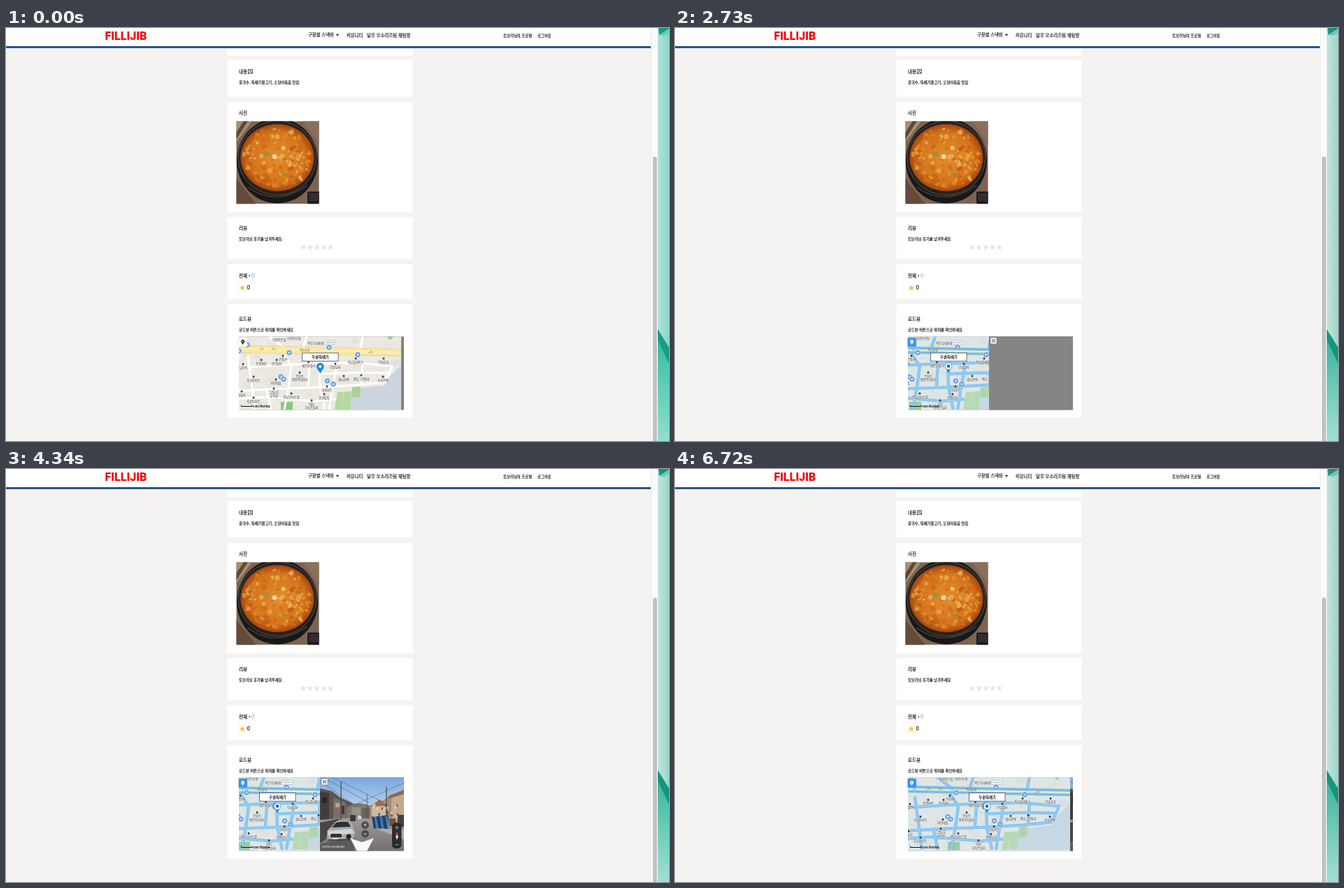
An HTML page for the animation above (8750 ms loop, 948 by 591 pixels).

```html
<!DOCTYPE html>
<html lang="ko">
<head>
<meta charset="utf-8">
<title>맛집 상세</title>
<style>
html, body { margin: 0; width: 100%; height: 100%; overflow: hidden; background: #f4f3f2; }
svg { display: block; width: 948px; height: 591px; }
text { font-family: "Noto Sans CJK KR", "Noto Sans CJK", "Noto Sans", sans-serif; }
.ink { fill: #111; stroke: #111; stroke-width: .16px; }
.logo { font-family: Roboto, "Liberation Sans", sans-serif; font-weight: 900; }
</style>
</head>
<body>
<svg id="stage" viewBox="0 0 948 591" xmlns="http://www.w3.org/2000/svg"></svg>
<script>
const LOOP = 8750, STEP = 70;

function rng(seed) {
  return () => (seed = (seed * 16807) % 2147483647) / 2147483647;
}
const rect = (x, y, w, h, fill, more = '') =>
  `<rect x="${x}" y="${y}" width="${w}" height="${h}" fill="${fill}" ${more}/>`;
const dot = (x, y, r, fill, more = '') =>
  `<circle cx="${x}" cy="${y}" r="${r}" fill="${fill}" ${more}/>`;
const oval = (x, y, rx, ry, fill, more = '') =>
  `<ellipse cx="${x}" cy="${y}" rx="${rx}" ry="${ry}" fill="${fill}" ${more}/>`;
const shape = (d, fill, more = '') => `<path d="${d}" fill="${fill}" ${more}/>`;
const line = (d, color, w, more = '') => shape(d, 'none', `stroke="${color}" stroke-width="${w}" ${more}`);
// text placed by the vertical centre of its glyphs
const label = (x, cy, size, str, more = 'class="ink"') =>
  `<text x="${x}" y="${(cy + size * 0.37).toFixed(2)}" font-size="${size}" ${more}>${str}</text>`;
const middle = 'text-anchor="middle"';

function star(cx, cy, r, fill) {
  const pts = [];
  for (let i = 0; i < 10; i++) {
    const a = i * Math.PI / 5, q = i % 2 ? r * 0.45 : r;
    pts.push((cx + q * Math.sin(a)).toFixed(2) + ',' + (cy - q * Math.cos(a)).toFixed(2));
  }
  return `<polygon points="${pts.join(' ')}" fill="${fill}"/>`;
}

function defs() {
  return `<defs>
    <linearGradient id="mint" x1="0" y1="0" x2="1" y2="0"><stop stop-color="#c2e5dc"/><stop offset="1" stop-color="#9ad6c8"/></linearGradient>
    <linearGradient id="teal" x1="0" y1="0" x2="0" y2="1"><stop stop-color="#2fae97"/><stop offset=".45" stop-color="#63c9b4"/><stop offset="1" stop-color="#a2dfd2"/></linearGradient>
    <linearGradient id="sky" x1="0" y1="0" x2="0" y2=".6"><stop stop-color="#78a9df"/><stop offset="1" stop-color="#d3e2f0"/></linearGradient>
    <linearGradient id="road" x1="0" y1="0" x2="0" y2="1"><stop stop-color="#a09b98"/><stop offset="1" stop-color="#747072"/></linearGradient>
    <radialGradient id="stew"><stop stop-color="#e18e2c"/><stop offset=".75" stop-color="#d4751c"/><stop offset="1" stop-color="#a8460e"/></radialGradient>
    <clipPath id="dishClip"><rect x="329.5" y="133.5" width="118" height="118"/></clipPath>
    <clipPath id="mapClip"><rect id="mapWin" x="333" y="441.5" width="232" height="105"/></clipPath>
    <clipPath id="viewClip"><rect x="449" y="441.5" width="120" height="105"/></clipPath>
    <clipPath id="edgeClip"><rect x="565" y="441.5" width="4" height="105"/></clipPath>
    <filter id="soft"><feGaussianBlur stdDeviation="1.1"/></filter>
  </defs>`;
}

function desktop() {
  return rect(932, 0, 16, 591, 'url(#mint)')
    + shape('M933 0H948V1L934 10Z', '#18907e')
    + shape('M934 10L948 1V7L941 11Z', '#73c6b6')
    + shape('M932 432L948 462V591H932Z', 'url(#teal)')
    + shape('M932 431L948 457V480L932 446Z', '#15957f')
    + rect(932, 0, 16, 591, '#27d6b0', 'id="glow"');
}

function frame() {
  return rect(0, 0, 922, 591, '#f4f3f2')
    + rect(922, 0, 10, 591, '#fafafa') + rect(922, 0, 0.8, 591, '#e6e6e6')
    + rect(925, 184, 5.8, 412, '#c1c1c1', 'rx="2.9"')
    + rect(0, 0, 922, 26, '#fff') + rect(0, 26, 922, 2.8, '#1d4b86')
    + '<text class="logo" x="141.5" y="17" font-size="16" fill="#f5080d">FILLIJIB</text>'
    + label(432, 10, 6.3, '구장별 스낵바') + shape('M471.7 8.8H476.3L474 11.2Z', '#111')
    + label(487, 10.8, 6.3, '커뮤니티')
    + label(516, 10.8, 6.4, '달무 오소리즈팀 채팅방')
    + label(711, 11.3, 5.4, '토보리님의 프로필')
    + label(760, 11.3, 5.3, '로그아웃');
}

function cards() {
  const tops = [[29.5, 10.5], [46, 52.5], [106, 157.5], [270.5, 60.5], [338, 50], [395, 162.5]];
  let s = tops.map(([y, h]) => rect(316.5, y, 265, h, '#fff')).join('');
  s += label(333, 62.2, 6.5, '내용')
    + rect(346.3, 59.6, 6.2, 5.4, 'none', 'stroke="#222" stroke-width=".8"')
    + line('M345.6 66L350.5 61M348 61.2H351M350 63.5H352', '#222', 0.7)
    + label(333, 77.6, 5.35, '콩국수, 뚝배기불고기, 오징어볶음 맛집')
    + label(333, 121.8, 6.5, '사진')
    + label(333, 286.6, 6.5, '리뷰')
    + label(333, 301.8, 5.3, '토보리님 후기를 남겨주세요.')
    + label(333, 354.3, 6.5, '전체') + dot(348.2, 354.4, 0.9, '#222')
    + label(351, 354.3, 7.6, '0', 'fill="#55a5dc"')
    + label(344.4, 371, 8, '0')
    + label(333, 416.6, 6.5, '로드뷰')
    + label(333, 431.8, 5.33, '로드뷰 버튼으로 위치를 확인하세요');
  for (let i = 0; i < 5; i++) s += star(425 + i * 9.75, 314, 4.6, '#e6e6e6');
  s += star(338, 372, 4.4, '#fbbf45')
    + line('M333.6 367.5L335 369M342.4 367.5L341 369M333 374.5H334.5M341.8 374.5H343', '#f5b95a', 0.7);
  return s;
}

function dish() {
  const r = rng(41);
  const tones = ['#eeb248', '#dc7a1e', '#bd5413', '#f2c46a', '#d0681a', '#e8952f'];
  let bits = '';
  for (let i = 0; i < 150; i++) {
    const a = r() * 6.283, q = Math.sqrt(r());
    const x = (388 + 48 * q * Math.cos(a)).toFixed(1), y = (185 + 43 * q * Math.sin(a)).toFixed(1);
    bits += oval(x, y, (1 + r() * 4).toFixed(1), (1 + r() * 2.6).toFixed(1), tones[i % 6],
      `opacity=".6" transform="rotate(${(r() * 180) | 0} ${x} ${y})"`);
  }
  return '<g clip-path="url(#dishClip)">' + rect(329, 133, 119, 119, '#7b6453')
    + shape('M329 133H352L329 164Z', '#a78f75') + shape('M329 150L340 133H346L329 160Z', '#5d4938')
    + shape('M448 133V165L424 133Z', '#8a705a') + shape('M329 215L358 252H329Z', '#644b3a')
    + oval(388, 190, 58, 61, '#191717')
    + oval(388, 186, 56, 53, '#262220', 'stroke="#57504b" stroke-width="1"')
    + oval(388, 185.5, 52.5, 48, 'url(#stew)') + bits
    + oval(372, 180, 5, 3.5, '#9a8f45', 'opacity=".8"') + oval(400, 209, 4, 2, '#96873b', 'opacity=".8"')
    + dot(384, 184, 3.6, '#f0d5a5') + dot(396, 171, 2.2, '#f2cc86')
    + line('M345 227Q386 257 431 225', '#3f3a37', 1.6)
    + rect(431, 234, 18, 18, '#1c191a', 'rx="2"') + rect(433, 236, 15, 12, '#302c30') + '</g>';
}

const MAIN = 'M320 459L450 462L640 466';
const STREETS = [
  'M320 487L400 482L448 480L500 479L552 484L548 494L541 507L500 511L450 514L395 516L320 520',
  'M320 531L372 528L440 534L472 531', 'M448 495L510 493L546 494',
  'M346 470L356 546', 'M372 515L379 546', 'M396 466L408 484L404 514L398 546',
  'M434 482L432 512', 'M448 480L449 514L456 546', 'M474 476L467 515L462 546',
  'M510 479L508 510', 'M340 441L346 460', 'M376 441L401 460',
  'M430 441L424 460', 'M510 441L506 462'
].join('');

const PLACES = [
  [391, 446, '여름아트빌'], [412, 444.5, '어린이공원'], [443, 451, '작은무대바람'],
  [396, 474, '구멍24'], [365, 480, '문결맨션'], [387, 480, '공단빌라'],
  [432.5, 483, '새온달빌라'], [471, 485.5, '안솔빌라'], [500, 478, '독담플레이스'],
  [540, 478, '먹돌상회'], [483, 503, '샘터주택'], [508, 502, '경담그린빌라'],
  [539, 504, '서루주택'], [420, 498, '문솔동'], [420, 503.5, '행정복지센터'],
  [354, 504, '포담아파트'], [386, 508, '파란해솔'], [459, 518, '마루마트'],
  [383, 521, '그린나우'], [383, 526, '유치원'], [408, 528, '안담오피스텔'],
  [455, 529, '문결빌딩'], [354, 534, '푸른아파트'], [437, 538, '대담'],
  [437, 543.5, '하루츠빌라'], [339, 486, '담주택'], [337, 525, '솔빌라']
];
const STOPS = [[462, 457], [503, 467.5], [405, 464.5], [393, 499], [397, 502.5], [459.5, 505], [468, 509.5], [345, 453.5], [333, 462]];

function mapLayer() {
  const r = rng(17);
  let s = rect(320, 430, 320, 125, '#ebe9e1');
  for (let i = 0; i < 80; i++) {
    s += rect((330 + r() * 215).toFixed(1), (440 + r() * 100).toFixed(1), (4 + r() * 8).toFixed(1), (3 + r() * 6).toFixed(1), i % 3 ? '#e6e3da' : '#efede7');
  }
  s += shape('M640 474L566 482L550 497L542 511L497 517L486 546H640Z', '#ccd5df')
    + shape('M542 489L566 482V474L552 476Z', '#dfe2e2')
    + shape('M474 521L494 520L492 546H470Z', '#b4d8a0') + line('M483 521L480 546', '#d0e6c3', 0.8)
    + shape('M495 514L507 513L506 528L494 529Z', '#a9d393')
    + rect(393, 535, 17, 12, '#8ec57b') + shape('M544 441H555L549 446.5Z', '#93cd87')
    + line(STREETS, '#fff', 3.2, 'stroke-linejoin="round"')
    + line(MAIN, '#dcca7c', 10.5) + line(MAIN, '#f9e9a4', 9.3)
    + line(MAIN, '#fff7d8', 0.6);
  s += '<g id="overlay">' + rect(320, 430, 320, 125, '#b9dcee', 'opacity=".28"')
    + line(STREETS, '#6dbaf0', 4.2, 'opacity=".9" stroke-linejoin="round"')
    + line(STREETS, '#94cdf4', 2, 'stroke-linejoin="round"')
    + `<g transform="translate(0 -3)">${line(MAIN, '#74bcee', 3.6)}</g>`
    + `<g transform="translate(0 3.4)">${line(MAIN, '#74bcee', 3.4)}</g></g>`;
  s += line('M365 457.5L368 459.5L362 460.5M384 457.5L380 459.5L386 460.5M520 462L524 464L518 465', '#8a8258', 0.6)
    + label(427, 461.2, 4, '먹소로로', 'fill="#665f42" ' + middle);
  for (const [x, y, name] of PLACES) {
    s += label(x, y, 4.2, name, `fill="#222" stroke="#fff" stroke-width=".5" paint-order="stroke" ${middle}`);
    if (y > 470 && y !== 503.5 && y < 540 && y !== 526) s += rect(x - 1.3, y - 6.4, 2.6, 2.8, '#444', 'rx=".6"');
  }
  s += rect(456, 447, 15, 6, '#f7f9fb', 'rx="1.5" stroke="#9aa9bb" stroke-width=".6"') + rect(458, 449.3, 11, 1.5, '#b5c0ce');
  for (const [x, y] of STOPS) s += dot(x, y, 3.8, '#4a8bd8', 'stroke="#fff" stroke-width=".5"') + rect(x - 1.7, y - 1.8, 3.4, 3.2, '#fff', 'rx=".6"') + rect(x - 1.1, y - 1.1, 2.2, 1.1, '#4a8bd8');
  s += '<g id="pin">' + shape('M449.3 495C447.5 490 444 488.5 444 484.3A5.3 5.3 0 0 1 454.6 484.3C454.6 488.5 451.2 490 449.3 495Z', '#2a86df') + dot(449.3, 484.4, 2, '#fff') + '</g>';
  s += '<g id="walker">'
    + shape('M449 494L446 488H452Z', '#3a7fc4')
    + shape('M444 489A7 7 0 0 1 447 478L449 484Z', '#2f7fd6', 'id="wedge"')
    + dot(449, 484, 5, '#fff', 'stroke="#5d9bdc" stroke-width="1"') + dot(449, 484, 2.4, '#1d72d2') + '</g>';
  s += rect(423.5, 465, 51.5, 11.8, '#fff', 'stroke="#4d5f74" stroke-width=".9"')
    + label(449.5, 471.2, 5.3, '두솥뚝배기', 'class="ink" ' + middle);
  return `<g clip-path="url(#mapClip)"><g id="map">${s}</g>`
    + line('M336.5 539.5V541.5H352V539.5', '#111', 1)
    + label(353.3, 541.3, 4, '50m', 'fill="#111" font-weight="700"')
    + label(363, 541.3, 4.4, 'Noriba', 'fill="#111" font-weight="700"') + '</g>';
}

function street() {
  const r = rng(9);
  let s = rect(449, 441, 120, 106, 'url(#sky)')
    + shape('M449 457L466 461L478 470L497 479V503H449Z', '#5d5450')
    + shape('M449 461L462 464V506H449Z', '#423c3a')
    + shape('M468 470L486 478V501H468Z', '#7d6e65')
    + rect(452, 470, 7, 8, '#272628') + rect(471, 478, 6, 6, '#b3a79c') + rect(480, 482, 4, 12, '#3e3937')
    + shape('M487 484Q500 474 522 482V502H487Z', '#77786f')
    + rect(494, 484, 13, 14, '#988f84') + rect(509, 485, 12, 14, '#6b6259')
    + shape('M569 460L550 466L540 474L520 482V505H569Z', '#a08d7d')
    + shape('M569 463L551 469V503H569Z', '#c3a98d')
    + shape('M547 468L569 459V465L547 472Z', '#99644a')
    + shape('M523 483L534 475L545 482V501H523Z', '#d0b89d') + shape('M521 483L534 473L546 482Z', '#a4694a');
  for (let i = 0; i < 18; i++) s += rect((524 + r() * 42).toFixed(1), (478 + r() * 17).toFixed(1), 2.6, 3.2, i % 2 ? '#5c5853' : '#dccdb9');
  s += shape('M449 502L497 499L569 505V547H449Z', 'url(#road)')
    + shape('M449 506L478 500L466 511L457 530L449 536Z', '#4a4645')
    + shape('M449 537L470 531L500 529L497 547H449Z', '#5c595a')
    + shape('M569 516L528 514L569 530Z', '#b5aca3')
    + line('M453 441L520 478M466 441L538 476M569 449L498 481M449 447L500 482', '#4b535f', 0.5)
    + line('M479 447V503M544 455V502', '#4b4744', 1.2) + line('M516 465V500', '#514c49', 0.8)
    + rect(492, 495, 8, 9, '#373a40', 'rx="1.5"') + rect(503, 496, 5, 5, '#d6d7d7', 'rx="1"')
    + shape('M459 525Q459 515 464 513L471 505Q474 502 486 503Q494 503 496 511L499 520Q499 527 495 529L465 532Q459 531 459 525Z', '#a9abae')
    + shape('M459 518L494 515L498 521L462 525Z', '#d2d4d6')
    + shape('M466 513L472 506Q481 504 489 505L493 512Z', '#2b3036')
    + rect(464, 522, 16, 5, '#303236', 'rx="1.5"')
    + dot(490, 526, 3.6, '#242425') + rect(467, 528.3, 8, 1.8, '#e6e6e6')
    + line('M460 531L496 530', '#353334', 1.6)
    + shape('M523 498L547 495V515L526 514Z', '#2a5288');
  for (let i = 0; i < 6; i++) s += line(`M${524 + i * 4} 497L${527 + i * 4} 515`, i % 2 ? '#6f9fcb' : '#1c2d46', 1.2);
  return s + rect(548, 500, 9, 11, '#735339') + rect(560, 495, 9, 17, '#4a4039');
}

function controls() {
  return shape('M492 528L509 534L526 528L516 547H502Z', '#f8f8f8', 'stroke="#aaa" stroke-width=".4"')
    + dot(513.5, 509.5, 5.4, '#454545', 'opacity=".9"') + dot(513.5, 522, 5.4, '#454545', 'opacity=".9"')
    + line('M511.5 509H515.5M513.5 507.5V511.5M511.5 521L513.5 523.5L515.5 521', '#eee', 0.9)
    + rect(552, 506, 13.5, 37, '#262626', 'rx="5.5" opacity=".93"')
    + line('M556.5 513H561.5M559 510.5V515.5M556.8 537.5H561.2', '#c9c9c9', 0.8)
    + shape('M559 519L561 525H557Z', '#e65247') + shape('M559 531L561 525H557Z', '#eee')
    + label(452, 540.3, 4, 'Noriba Roadmap', 'fill="#f4f4f4"');
}

function viewer() {
  return '<g id="viewer"><g clip-path="url(#viewClip)">'
    + rect(449, 441, 120, 106, '#858585')
    + `<g id="scene"><g id="blurred"><g id="street">${street()}</g></g>${controls()}</g>`
    + '</g>' + rect(451, 443, 9, 9, '#fafafa', 'stroke="#777" stroke-width=".6"')
    + line('M453.2 445.2L457.8 449.8M457.8 445.2L453.2 449.8', '#222', 1) + '</g>'
    + '<g id="edge" clip-path="url(#edgeClip)"><use href="#street" x="116"/></g>';
}

function button() {
  return rect(332.5, 443, 12.5, 13, '#fff', 'id="btn" rx="1.2" stroke="#bbb" stroke-width=".4"')
    + shape('M338.6 446A2.7 2.7 0 0 1 339.7 451.1L338.6 453.6L337.5 451.1A2.7 2.7 0 0 1 338.6 446Z', '#222', 'id="btnPin"')
    + dot(338.6, 448.6, 0.9, '#fff', 'id="btnDot"');
}

const stage = document.getElementById('stage');
stage.innerHTML = defs() + desktop() + frame() + cards() + dish()
  + rect(333, 441.5, 236, 105, '#828282') + mapLayer() + viewer() + button();

const $ = id => document.getElementById(id);
const set = (id, name, value) => $(id).setAttribute(name, value);
const show = (id, on) => set(id, 'visibility', on ? 'visible' : 'hidden');
const ramp = (t, a, b) => Math.min(1, Math.max(0, (t - a) / (b - a)));

function draw(time) {
  const t = Math.floor(time / STEP) * STEP;
  const active = t >= 2450, open = t >= 2730 && t < 6300, panned = t >= 3150;
  const left = t >= 2730 && t < 6370;
  set('map', 'transform', `translate(${(left ? -58 : 0) - (panned ? 3 : 0)} ${panned ? -1.5 : 0})`);
  set('mapWin', 'width', open ? 116 : 232);
  set('overlay', 'opacity', ramp(t, 2450, 2660));
  show('pin', !active);
  show('walker', active);
  set('wedge', 'opacity', panned ? 1 : 0);
  set('btn', 'fill', active ? '#3994ee' : '#fff');
  set('btnPin', 'fill', active ? '#fff' : '#222');
  set('btnDot', 'fill', active ? '#3994ee' : '#fff');
  show('viewer', open);
  show('edge', t >= 6300);
  const fade = 1 - ramp(t, 3150, 3780);
  set('scene', 'opacity', 1 - fade * fade);
  set('blurred', 'filter', t < 3570 ? 'url(#soft)' : 'none');
  set('glow', 'opacity', t < 1190 ? 0.12 : 0);
}

function tick() {
  draw(performance.now() % LOOP);
  requestAnimationFrame(tick);
}
tick();
</script>
</body>
</html>
```
